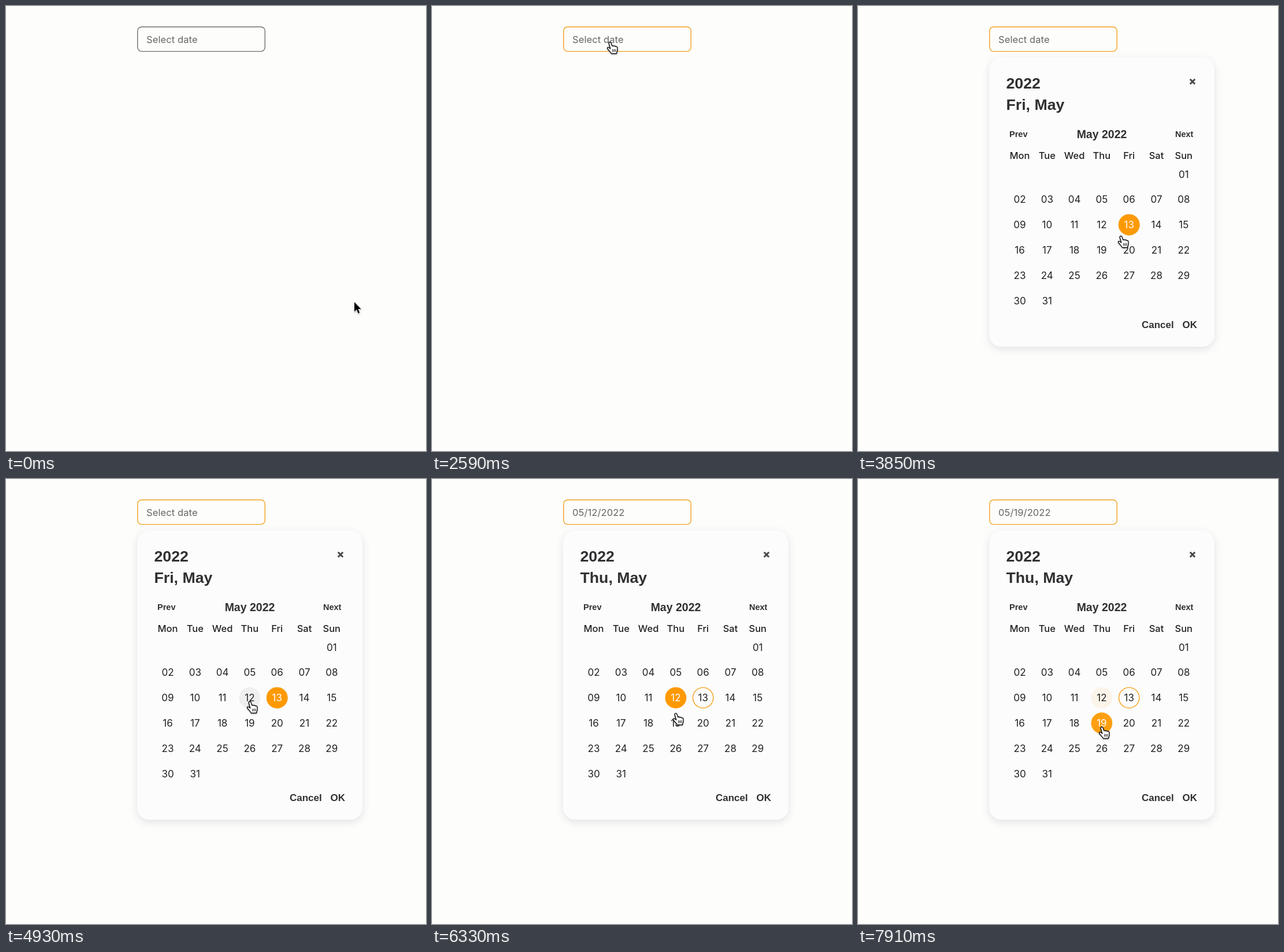
These frames come from a looping animation (727x771 px, 8 s). An HTML page:

```html
<!DOCTYPE html>
<html lang="en">
<head>
<meta charset="utf-8">
<title>Date picker</title>
<style>
html, body { margin: 0; width: 100%; height: 100%; overflow: hidden; background: #fdfdfc; }
svg { display: block; }
text { font-family: Inter, sans-serif; font-size: 17px; fill: #202022; }
.bold { font-family: "Liberation Sans", Arial, sans-serif; font-weight: 700; fill: #303033; }
.mid { text-anchor: middle; }
#value { font-size: 16.5px; letter-spacing: .1px; fill: #666; }
#field { fill: none; stroke-width: 1.4; }
#panel > rect { fill: #fcfcfc; filter: drop-shadow(0 4px 7px rgba(30, 30, 50, .12)); }
.cursor { filter: drop-shadow(0 1.5px 1.2px rgba(0, 0, 0, .35)); stroke-linejoin: round; }
</style>
</head>
<body>
<svg width="727" height="771" viewBox="0 0 727 771">
  <rect id="field" x="227.7" y="36.2" width="220.6" height="42.4" rx="7"/>
  <text id="value" x="243" y="63.5"></text>
  <g id="panel">
    <rect x="227" y="89" width="390" height="501.5" rx="21"/>
    <path d="M574.8 126.8l8.4 8.4m0-8.4l-8.4 8.4" stroke="#48484a" stroke-width="3"/>
  </g>
  <g id="arrow" class="cursor">
    <path d="M0 0V16.5L3.9 13 6.6 19.4 9.2 18.3 6.5 12H11.6Z" stroke="#fff" stroke-width="1.6" paint-order="stroke"/>
  </g>
  <g id="hand" class="cursor" stroke="#111" stroke-width="1.4" stroke-linecap="round">
    <path fill="#fff" d="M-1.8 2C-2.6-.3 .8-1.4 1.8 .8L4 6.6C4.6 5.2 6.6 5.3 7 6.8 7.8 5.8 9.8 6 10.1 7.6 11 6.9 12.7 7.3 12.8 9L13 13C13 15.2 11.8 16.5 11.5 19.5H2.5C1.5 17-1.8 14.5-4.2 11-5.3 9-3.5 7.9-2 9L.8 11Z"/>
    <path d="M4.8 12.2V16M7.3 12.2V16M9.8 12.2V16" stroke-width="1.1"/>
  </g>
</svg>
<script>
const LOOP = 8000, FOCUS = 870, OPEN = 2650, PICK_12 = 5130, PICK_19 = 7410, FADE = 600;
const ORANGE = [255, 153, 0], GREY = [239, 239, 239];
const byId = id => document.getElementById(id);
const field = byId('field'), value = byId('value'), panel = byId('panel');
const arrow = byId('arrow'), hand = byId('hand');

// Pointer stops: time, x, y
const stops = [
  [20, 603, 513], [770, 318, 43], [1010, 318, 28], [1230, 313, 18],
  [1610, 308, 48], [1850, 307, 67], [2130, 308, 63], [2690, 308, 63],
  [3650, 455, 399], [4130, 455, 399], [4900, 422, 386],
  [5950, 422, 386], [6750, 422, 430]
];

function add(tag, attrs, content = '') {
  const node = document.createElementNS('http://www.w3.org/2000/svg', tag);
  for (const name in attrs) node.setAttribute(name, attrs[name]);
  node.textContent = content;
  panel.append(node);
  return node;
}

function label(content, x, y, size, className) {
  return add('text', { x, y, class: className, style: `font-size:${size}px` }, content);
}

label('2022', 256.5, 142.5, 26.7, 'bold');
const heading = label('', 256.5, 180.3, 26.7, 'bold');
label('Prev', 262, 226.5, 14.5, 'bold');
label('May 2022', 422, 228.5, 19.5, 'bold mid');
label('Next', 549, 226.5, 14.5, 'bold');
label('Cancel', 491, 557.5, 17, 'bold');
label('OK', 561.5, 557.5, 17, 'bold');

const columnX = column => 280 + 47.3 * column;
['Mon', 'Tue', 'Wed', 'Thu', 'Fri', 'Sat', 'Sun'].forEach((name, i) =>
  label(name, columnX(i), 264.5, 16.5, 'mid').setAttribute('font-weight', 500));

const days = {};
for (let day = 1; day <= 31; day++) {
  const cell = day + 5, x = columnX(cell % 7), y = 291.5 + 43.8 * Math.floor(cell / 7);
  const disc = add('circle', { cx: x, cy: y, r: 18.4, fill: 'none' });
  days[day] = { disc, text: label(String(day).padStart(2, '0'), x, y + 6, 17, 'mid') };
}
add('circle', { cx: columnX(4), cy: 379.1, r: 17.7, fill: 'none', stroke: '#f5a01c', 'stroke-width': 1.4 });

function ease(t, start, duration) {
  const p = Math.min(1, Math.max(0, (t - start) / duration));
  return p * p * (3 - 2 * p);
}

function pointerAt(t) {
  let [, x, y] = stops[0];
  for (let i = 1; i < stops.length; i++) {
    const [t0, x0, y0] = stops[i - 1], [t1, x1, y1] = stops[i];
    const p = ease(t, t0, t1 - t0);
    x += (x1 - x0) * p;
    y += (y1 - y0) * p;
  }
  return [x, y];
}

function paintDay(day, chosen, amount, hover = 0) {
  const { disc, text } = days[day];
  const rgb = GREY.map((v, i) => hover ? v + (ORANGE[i] - v) * amount : ORANGE[i]);
  disc.style.fill = `rgba(${rgb},${hover || amount})`;
  text.style.fill = chosen ? '#fff' : '';
}

function render(t) {
  const first = t >= PICK_12, second = t >= PICK_19;
  const toFirst = ease(t, PICK_12, FADE), toSecond = ease(t, PICK_19, FADE);

  field.style.stroke = t < FOCUS ? '#70706a' : '#f2a11d';
  value.textContent = second ? '05/19/2022' : first ? '05/12/2022' : 'Select date';
  heading.textContent = first ? 'Thu, May' : 'Fri, May';
  panel.style.opacity = ease(t, OPEN, 250);

  paintDay(13, !first, 1 - toFirst);
  paintDay(12, first && !second, second ? 1 - toSecond : toFirst,
    second ? 0 : ease(t, 4450, 400));
  paintDay(19, second, toSecond, ease(t, 6350, 400));
  // The hovered state drops the light text once the pointer moves on.
  if (t > 6350) days[12].text.style.fill = '';

  const [x, y] = pointerAt(t);
  const overField = x > 227 && x < 449 && y > 36 && y < 79;
  const overGrid = t > OPEN && x > 257 && x < 587 && y > 270 && y < 530;
  const isHand = overField || overGrid;
  arrow.style.display = isHand ? 'none' : '';
  hand.style.display = isHand ? '' : 'none';
  (isHand ? hand : arrow).setAttribute('transform', `translate(${x} ${y})`);
}

const begin = performance.now();
function tick() {
  render((performance.now() - begin) % LOOP);
  requestAnimationFrame(tick);
}
tick();
</script>
</body>
</html>
```
